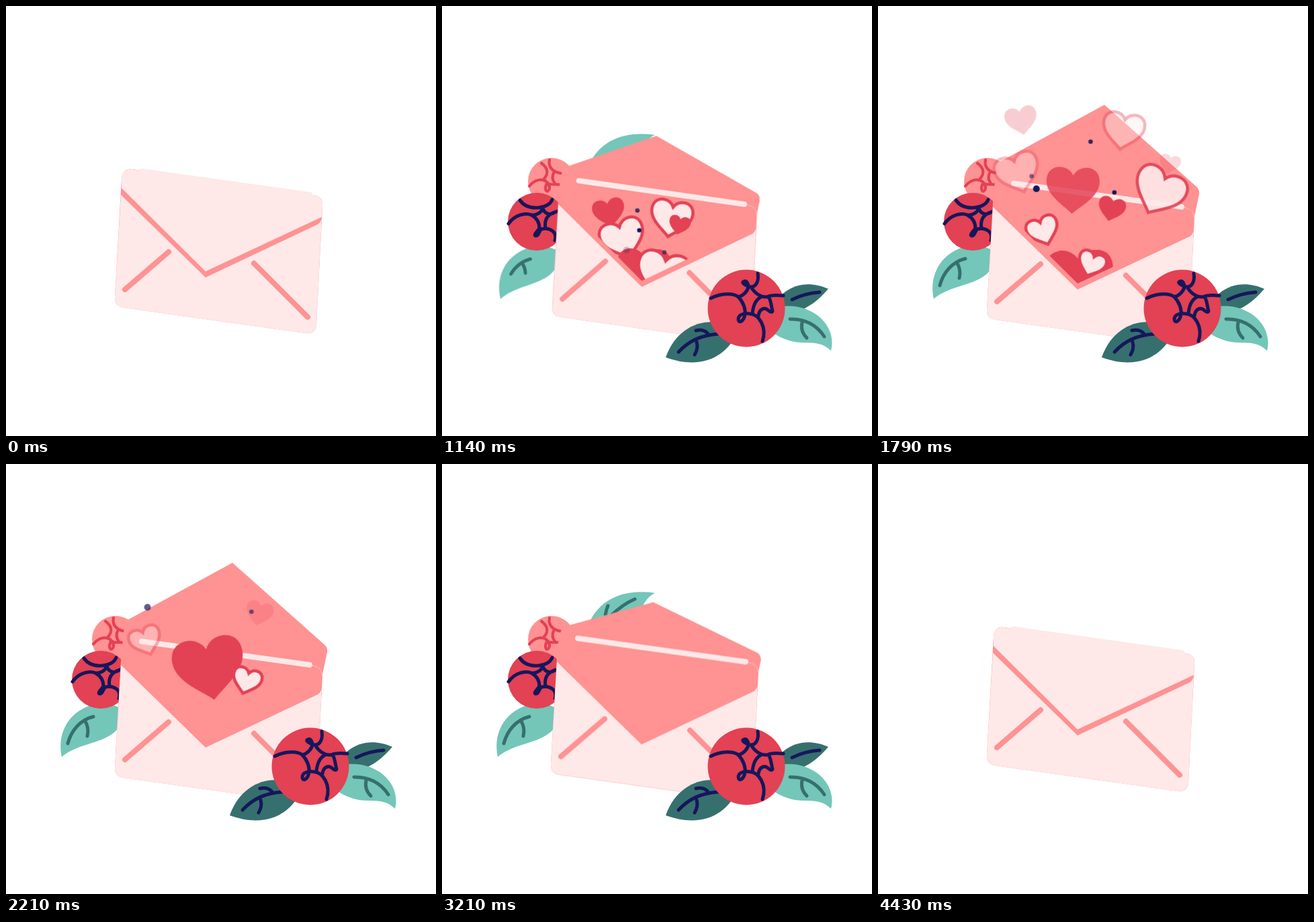
An HTML page without scripts that plays this animation: 640 by 640 pixels, repeating every 5070 ms.

```html
<!DOCTYPE html>
<html lang="en">
<head>
<meta charset="utf-8">
<title>Love letter</title>
<style>
html, body { margin: 0; height: 100%; overflow: hidden; background: #fff; }
svg { display: block; width: 100%; height: 100%; }

.pink { fill: #ff9292; }
.pale { fill: #fee8e8; }
.red { fill: #e34154; }
.teal { fill: #74c6b9; }
.dark { fill: #36706e; }
.navy { fill: #16175b; }
.line { fill: none; stroke-width: 5; stroke-linecap: round; stroke-linejoin: round; }
.ink { stroke: #16175b; }
.moss { stroke: #36706e; }
.rose { stroke: #e34154; stroke-width: 4.2; }
.blush { stroke: #ff9292; stroke-width: 8; }
.cream { stroke: #fee8e8; stroke-width: 8; }

.env, .flap, .lid, .leaf, .vein, .bloom, .rise { animation: 5070ms linear infinite both; }

/* envelope */
.env { animation-name: env; transform-origin: 317px 365px; }
@keyframes env {
  0%, 6.9% { transform: none; animation-timing-function: ease-out; }
  12.6% { transform: translateY(-6px) scaleX(.95); animation-timing-function: ease-in-out; }
  22.5% { transform: translateY(14px) scaleX(.985); animation-timing-function: ease-out; }
  25.2%, 60.2% { transform: translateY(18px) scaleX(1); }
  70.4% { transform: translateY(3px) scaleX(1); }
  71.8%, 100% { transform: none; }
}
.flap { animation-name: flap; }
@keyframes flap {
  0%, 18.9%, 66.6%, 100% { d: path("M173 260Q174 241 187 243L291 258L458 282Q472 284 471 297L470 300L297 380Z"); }
  24.8%, 60.2% { d: path("M173 260Q174 218 183 213L337 129L473 250Q479 255 478 262L470 300L297 380Z"); }
}
.lid { animation-name: lid; }
@keyframes lid {
  0%, 12.6%, 71.8%, 100% { visibility: visible; d: path("M187 243L458 282Q472 284 471 297L470 314L297 395L172 271L172 257Q174 241 187 243Z"); }
  18.9%, 66.61% { visibility: visible; d: path("M187 243L458 282Q472 284 471 290L471 298L280 258L172 252L172 250Q174 241 187 243Z"); }
  18.91%, 66.6% { visibility: hidden; d: path("M187 243L458 282Q472 284 471 290L471 298L280 258L172 252L172 250Q174 241 187 243Z"); }
}

/* plants */
.leaf { animation-name: leaf; transform-origin: var(--o); animation-delay: var(--t, 0ms); }
@keyframes leaf {
  0%, 4% { transform: rotate(var(--r)) scale(0); animation-timing-function: ease-out; }
  11.2% { transform: rotate(var(--r)) scale(var(--s)); animation-timing-function: cubic-bezier(.2, .7, .3, 1); }
  24%, 69% { transform: rotate(0deg) scale(1); }
  70.4% { transform: rotate(var(--x, 0deg)) scale(.97); animation-timing-function: ease-in; }
  80%, 100% { transform: rotate(var(--r)) scale(0); }
}
.vein { animation-name: vein; animation-delay: var(--v, 0ms); stroke-dasharray: 1 2; }
@keyframes vein {
  0%, 7% { stroke-dashoffset: 1; }
  20%, 100% { stroke-dashoffset: 0; }
}
.bloom { animation-name: bloom; transform-origin: var(--o); animation-delay: var(--t, 0ms); }
@keyframes bloom {
  0%, 1.4% { transform: scale(0); animation-timing-function: cubic-bezier(.2, .8, .3, 1); }
  9.9%, 69% { transform: scale(1); }
  70.4% { transform: scale(1.02); animation-timing-function: ease-in; }
  83%, 100% { transform: scale(0); }
}

/* hearts and dots */
.rise { animation-name: rise; animation-delay: var(--t); }
@keyframes rise {
  0% { transform: translate(var(--a)) rotate(var(--r, 0deg)) scale(var(--s, 1)); opacity: 0; }
  2%, 18.9% { opacity: 1; }
  27.61%, 100% { transform: translate(var(--b)) rotate(var(--q, var(--r, 0deg))) scale(var(--z, var(--s, 1))); opacity: 0; }
}
.open { fill: #fee8e8; stroke: #e34154; stroke-width: 4.5; }
.heart { vector-effect: non-scaling-stroke; }
</style>
</head>
<body>
<svg viewBox="0 0 640 640">
  <defs>
    <path id="h" class="heart" d="M0 35C-14 22-40 8-40-14C-40-28-31-35-20-35C-11-35-4-30 0-23C4-30 11-35 20-35C31-35 40-28 40-14C40 8 14 22 0 35Z"/>
    <clipPath id="mouth"><path d="M0 0H640V430H0Z"/></clipPath>
  </defs>

  <!-- plants behind -->
  <g class="leaf" style="--o:265px 275px;--r:-24deg;--s:.75">
    <path class="dark" d="M262 285C262 250 290 230 333 233C325 250 316 268 295 282Z"/>
  </g>
  <g class="leaf" style="--o:225px 275px;--r:-52deg;--s:.4;--v:800ms">
    <path class="teal" d="M212 270C213 225 245 182 317 192C290 205 295 245 272 262L225 285Z"/>
    <path class="line moss vein" pathLength="1" d="M225 265C238 235 262 212 287 201"/>
    <path class="line moss vein" pathLength="1" d="M244 233C242 225 244 218 247 211"/>
  </g>
  <g class="leaf" style="--o:170px 360px;--r:-60deg;--s:0;--t:120ms;--v:350ms">
    <path class="teal" d="M83 436C74 395 100 357 150 355L175 365C175 420 115 408 83 436Z"/>
    <path class="line moss vein" pathLength="1" d="M130 376C110 381 97 397 92 416"/>
    <path class="line moss vein" pathLength="1" d="M118 383C122 390 123 397 121 405"/>
  </g>
  <g class="bloom" style="--o:163px 261px;--t:150ms">
    <circle class="pink" cx="163" cy="261" r="35"/>
    <path class="line rose" d="M130 268C138 258 150 256 156 262M148 234C156 240 160 248 152 257M160 229C158 238 163 247 177 249M156 262C160 268 166 264 175 266M166 249C163 255 165 260 168 264M157 263C152 270 154 278 158 275C161 273 160 268 158 264"/>
  </g>
  <g class="bloom" style="--o:141px 321px;--t:200ms">
    <circle class="red" cx="141" cy="321" r="43"/>
    <path class="line ink" d="M99 324C108 311 124 307 133 311C142 316 145 324 145 331M116 289C122 298 133 301 144 300C155 299 162 294 164 288M133 311C141 312 148 307 150 301C152 308 160 313 168 307M145 331C142 335 136 341 139 342C144 343 144 335 148 332C160 329 172 336 168 349M154 330C152 318 156 309 174 305"/>
  </g>

  <!-- envelope back -->
  <g class="env">
    <path class="flap pink" d="M173 260Q174 241 187 243L291 258L458 282Q472 284 471 297L470 300L297 380Z"/>
    <path class="pink" d="M187 243L458 282Q472 284 471 297L462 474Q461 489 446 487L175 449Q161 447 162 433L172 257Q174 241 187 243Z"/>
    <path class="line cream" d="M202 246L452 281"/>
    <path fill="none" stroke="#fee8e8" opacity=".5" d="M454 281.500Q471 284 470.500 297"/>
  </g>

  <g clip-path="url(#mouth)">
    <use href="#h" class="rise red" style="--a:283px,441px;--b:207px,146px;--r:-11deg;--s:.6;--t:510ms"/>
    <use href="#h" class="rise open" style="--a:320px,432px;--b:371px,152px;--r:10deg;--s:.77;--t:565ms"/>
    <use href="#h" class="rise open" style="--a:326px,437px;--b:194px,226px;--r:-18deg;--s:.82;--t:545ms"/>
    <use href="#h" class="rise red" style="--a:271px,419px;--b:445px,223px;--r:13deg;--s:.4;--t:480ms"/>
    <use href="#h" class="rise red" style="--a:306px,466px;--b:284px,205px;--r:2deg;--s:.99;--t:765ms"/>
    <use href="#h" class="rise open" style="--a:280px,468px;--b:472px,201px;--r:5deg;--q:35deg;--s:.97;--t:790ms"/>
    <use href="#h" class="rise red" style="--a:285px,472px;--b:383px,206px;--r:14deg;--s:.51;--t:900ms"/>
    <use href="#h" class="rise open" style="--a:319px,473px;--b:193px,235px;--r:-20deg;--s:.59;--t:980ms"/>
    <use href="#h" class="rise red" style="--a:299px,460px;--b:307px,119px;--r:2deg;--q:-23deg;--s:1.22;--z:1.45;--t:1575ms"/>
    <use href="#h" class="rise open" style="--a:286px,432px;--b:421px,228px;--r:25deg;--q:9deg;--s:.5;--z:.57;--t:1465ms"/>
    <circle class="rise navy" r="3.300" fill-opacity=".8" style="--a:333px,339px;--b:199px,229px;--t:700ms"/>
    <circle class="rise navy" r="3.300" style="--a:281px,407px;--b:330px,123px;--t:780ms"/>
    <circle class="rise navy" r="5" style="--a:276px,366px;--b:192px,170px;--t:1120ms"/>
    <circle class="rise navy" r="3.300" style="--a:329px,375px;--b:374px,183px;--t:1080ms"/>
  </g>

  <!-- envelope front -->
  <g class="env">
    <path class="pink" d="M172 271L297 395L470 314L470 325L297 406L171 283Z"/>
    <path class="pale" d="M171 281L297 404L464 325Q470 321 470 313L462 474Q461 489 446 487L175 449Q161 447 162 433Z"/>
    <path class="line blush" d="M242 366L177 422M369 383L449 463"/>
    <path class="lid pale" d="M187 243L458 282Q472 284 471 297L470 314L297 395L172 271L172 257Q174 241 187 243Z"/>
  </g>

  <!-- plants in front -->
  <g class="leaf" style="--o:490px 455px;--r:-7deg;--s:.7">
    <path class="dark" d="M490 455C500 423 535 403 575 421C555 445 535 455 505 462Z"/>
    <path class="line ink vein" pathLength="1" d="M521 437C535 430 548 427 562 426"/>
  </g>
  <g class="leaf" style="--o:485px 470px;--r:4deg;--s:.9">
    <path class="teal" d="M485 452C540 432 590 470 579 513C555 490 535 513 495 488Z"/>
    <path class="line moss vein" pathLength="1" d="M518 466C540 465 558 475 569 492"/>
    <path class="line moss vein" pathLength="1" d="M536 471C534 480 537 488 543 494"/>
  </g>
  <g class="leaf" style="--o:430px 480px;--r:-8deg;--s:.98;--x:3.500deg">
    <path class="dark" d="M333 523C348 480 385 465 415 472L440 485C425 520 388 543 333 523Z"/>
    <path class="line ink vein" pathLength="1" d="M412 488C385 490 368 498 352 515"/>
    <path class="line ink vein" pathLength="1" d="M396 488C392 483 386 481 378 483"/>
    <path class="line ink vein" pathLength="1" d="M379 500C381 507 379 514 376 519"/>
  </g>
  <g class="bloom" style="--o:453px 450px">
    <circle class="red" cx="453" cy="450" r="57.500"/>
    <path class="line ink" d="M400 435C416 427 434 427 441 433C449 441 452 452 451 459C449 470 441 473 441 466C441 459 450 457 458 458C472 459 484 478 477 499M470 398C472 410 467 418 460 418C455 418 444 412 449 410C454 408 456 414 456 418C455 424 449 431 441 433M460 418C465 427 474 434 484 433C492 429 500 431 508 431M462 458C463 445 467 437 475 433M471 461C472 452 478 449 483 451C486 453 491 458 492 454C490 448 490 438 486 433"/>
  </g>
</svg>
</body>
</html>
```
